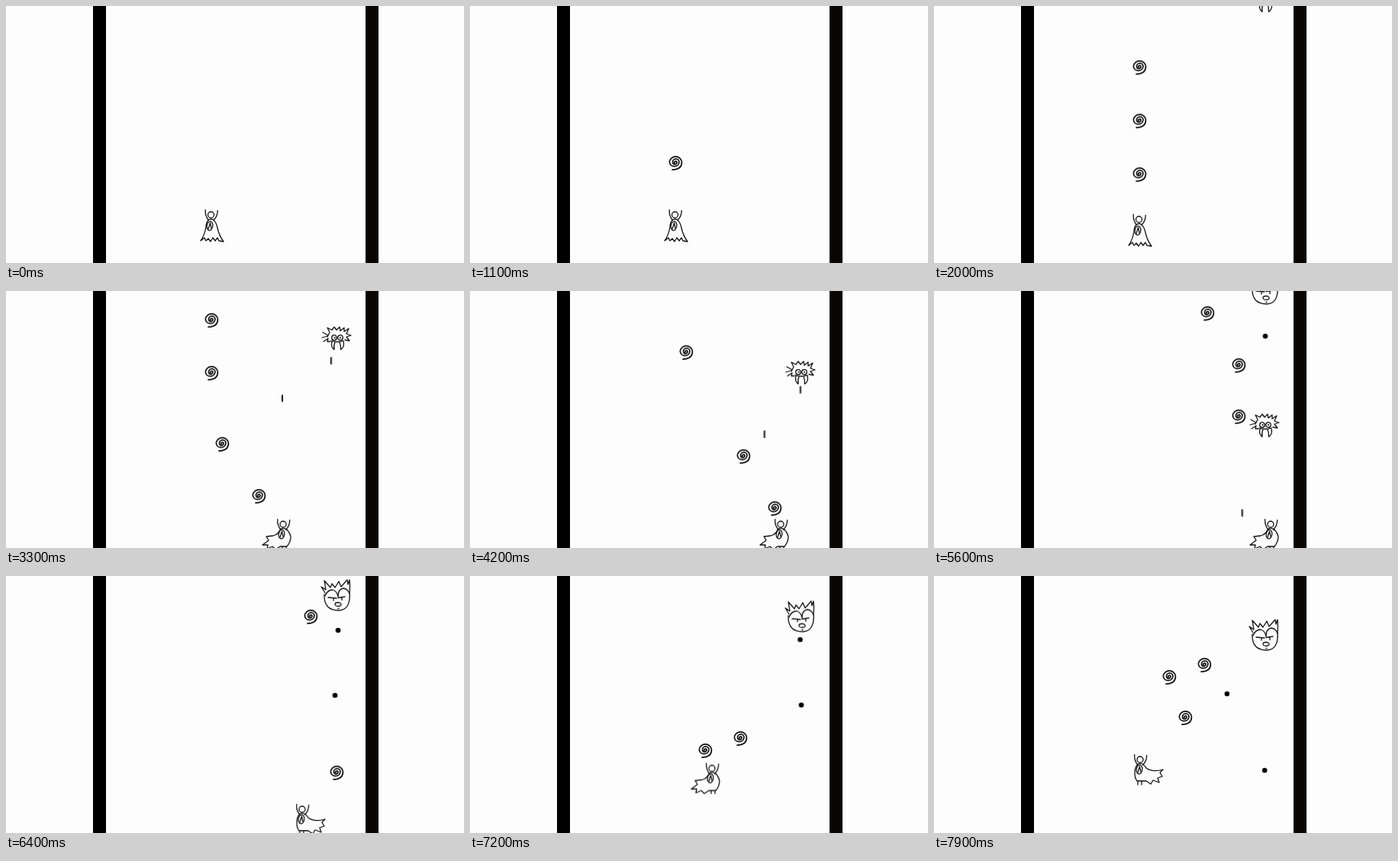
Write an HTML page without scripts that moves like this. It is 600x336 px and loops after 8 s.

```html
<!DOCTYPE html>
<html lang="en">
<head>
<meta charset="utf-8">
<title>Doodle shooter</title>
<style>
html, body { margin: 0; width: 100%; height: 100%; overflow: hidden; background: #fefdfe; }
svg { display: block; width: 600px; height: 336px; }
.ink { fill: none; stroke: #111; stroke-width: 1.3; stroke-linecap: round; stroke-linejoin: round; }

/* spirals share one upward drift; each appears when thrown */
.drift { animation: drift 8s linear infinite; }
.drift use, .shot { visibility: hidden; }
.drift use { animation: var(--life, live) 8s step-end calc(.68s + .5s * var(--n)) infinite; }
.shot { animation: fly 8s linear calc(1s * var(--at)) infinite, var(--life, live) 8s step-end calc(1s * var(--at)) infinite; }
@keyframes drift {
  0% { transform: translateY(0); }
  25% { transform: translateY(-278px); }
  41.25% { transform: translateY(-460px); }
  52.5% { transform: translateY(-580px); }
  70% { transform: translateY(-767px); }
  80% { transform: translateY(-878px); }
  98.75%, 100% { transform: translateY(-1084px); }
}
@keyframes fly {
  0% { transform: translate(0, 0); }
  30%, 100% { transform: translate(var(--dx), var(--dy)); }
}
@keyframes live { 0% { visibility: visible; } 30%, 100% { visibility: hidden; } }
@keyframes mid { 0% { visibility: visible; } 19.4%, 100% { visibility: hidden; } }
@keyframes hit { 0% { visibility: visible; } 6.8%, 100% { visibility: hidden; } }
@keyframes brief { 0% { visibility: visible; } 4.5%, 100% { visibility: hidden; } }

.hero { animation: hero 8s linear infinite; }
@keyframes hero {
  0%, 23% { transform: translate(269px, 266px); }
  25% { transform: translate(269px, 272px); }
  27.5% { transform: translate(269px, 277px); }
  31.9% { transform: translate(269px, 297px); }
  33.5% { transform: translate(283px, 298px); }
  39.75% { transform: translate(331px, 298px); }
  41.25% { transform: translate(355px, 298px); }
  46%, 49% { transform: translate(358px, 298px); }
  52.4%, 62.5% { transform: translate(399px, 298px); }
  64.75% { transform: translate(425px, 298px); }
  66%, 77.25% { transform: translate(433px, 298px); }
  80% { transform: translate(399px, 298px); }
  83.5% { transform: translate(354px, 298px); }
  89.75% { transform: translate(308px, 245px); }
  96% { transform: translate(329px, 232px); }
  98.75%, 100% { transform: translate(281px, 233px); }
}
.idle { animation: idle 8s step-end infinite; }
.right { animation: right 8s step-end infinite; }
.left { animation: left 8s step-end infinite; }
@keyframes idle { 0% { visibility: visible; } 31.9%, 100% { visibility: hidden; } }
@keyframes right {
  0% { visibility: hidden; }
  31.9% { visibility: visible; }
  77.5% { visibility: hidden; }
  90% { visibility: visible; }
  96%, 100% { visibility: hidden; }
}
@keyframes left {
  0% { visibility: hidden; }
  77.5% { visibility: visible; }
  90% { visibility: hidden; }
  96%, 100% { visibility: visible; }
}

.beast { animation: beast 8s linear infinite, slain 8s step-end infinite; }
@keyframes beast {
  0%, 22% { transform: translate(433px, -27px); }
  25% { transform: translate(433px, -7px); }
  41.25% { transform: translate(433px, 62px); }
  52.5% { transform: translate(433px, 107px); }
  70% { transform: translate(433px, 176px); }
  78%, 100% { transform: translate(433px, 207px); }
}
@keyframes slain { 0% { visibility: visible; } 77.6%, 100% { visibility: hidden; } }

.late { animation: late 8s step-end infinite; }
@keyframes late { 0% { opacity: 0; } 50%, 100% { opacity: 1; } }
.face { animation: face 8s linear infinite; }
@keyframes face {
  0%, 60% { transform: translate(434px, -31px); }
  70% { transform: translate(434px, -3px); }
  80% { transform: translate(434px, 25px); }
  98.75%, 100% { transform: translate(434px, 77px); }
}
</style>
</head>
<body>
<svg viewBox="0 0 600 336">
  <defs>
    <path id="s" stroke-width="1.75" d="M-1 1A1.5 1.5 0 0 1 2 0A2.75 2.75 0 0 1 -3.5 0A4.25 4.25 0 0 1 5 0A6.4 6.4 0 0 1 -7.7 0A8.1 8.1 0 0 1 8.4 0M8.4 0Q8.4 10-4 10" />
    <g id="top">
      <path d="M-7.300 .5Q-7.800 9-3 14M8.700 1.500Q8.700 9 3.500 14" />
      <circle cx="0" cy="7" r="4" />
    </g>
    <g id="badge">
      <ellipse rx="3.800" ry="6" transform="rotate(8)" />
      <path d="M-2 4L.5-4L2 3" />
    </g>
  </defs>

  <path d="M114 0H131V336H114Z" />
  <path fill="#080503" d="M471 0H488V336H471Z" />

  <g class="ink">
    <g class="drift">
      <use href="#s" x="269" y="357" style="--n:0" />
      <use href="#s" x="269" y="427" style="--n:1" />
      <use href="#s" x="269" y="497" style="--n:2" />
      <use href="#s" x="269" y="566" style="--n:3" />
      <use href="#s" x="283" y="659" style="--n:4" />
      <use href="#s" x="331" y="727" style="--n:5;--life:hit" />
      <use href="#s" x="358" y="795" style="--n:6" />
      <use href="#s" x="399" y="863" style="--n:7" />
      <use href="#s" x="399" y="930" style="--n:8" />
      <use href="#s" x="425" y="997" style="--n:9;--life:brief" />
      <use href="#s" x="433" y="1065" style="--n:10;--life:hit" />
      <use href="#s" x="433" y="1134" style="--n:11;--life:hit" />
      <use href="#s" x="354" y="1199" style="--n:12" />
      <use href="#s" x="308" y="1215" style="--n:13" />
      <use href="#s" x="329" y="1268" style="--n:14" />
    </g>

    <g stroke-width="2" stroke-linecap="butt">
      <path class="shot" d="M433 19.500v9" style="--at:2.18;--dx:-152px;--dy:249px;--life:mid" />
      <path class="shot" d="M431.300 73.500v9.500" style="--at:3.18;--dx:-107px;--dy:256px" />
      <path class="shot" d="M433.400 122v9.500" style="--at:4.18;--dx:-50px;--dy:276px" />
      <path class="shot" d="M433 171.500v9" style="--at:5.18;--dx:-20px;--dy:276px;--life:brief" />
    </g>

    <g class="beast">
      <path d="M-12-2L-9-8L-12-14L-6-11L-3-15L0-11L4-15L5-10L10-14L10-9L16-13L13-6L19-4L13-2L17 3L11 2M-18-8L-11-4M-19-1L-12-3M-17 4L-11 0L-12 4L-8 4" />
      <circle cx="-3" cy="-1" r="3.300" />
      <circle cx="5" cy="-1" r="3.300" />
      <path stroke-width="2" d="M-2.500-1h.1M5-1h.1" />
      <path d="M-7 3Q1 6 9 3M-6 4Q-8 11-3 14.500Q-4 9-2 5M9 4Q11 11 5.500 14.500Q6 9 4 5" />
    </g>

    <g class="late">
      <g class="face">
        <path d="M-17-1Q-18 20 2 20Q18 19 16-4M-16-3L-21-11L-15-7L-17-19L-9-10L-7-15L-3-10L2-18L5-11L13-20L14-14L16-20Q17-10 16-3" />
        <path d="M-16 1Q-13-7-6-7Q0-5 1 2Q1-8 8-9Q14-8 16-2M-12 3L-1 4M1 3.500L10 2M-5 4v3M6 3v3.500" />
        <ellipse cx="1" cy="12" rx="4" ry="2.500" />
        <path d="M1 17.500h1" />
      </g>
      <g fill="#000" stroke="none">
        <circle class="shot" cx="435.600" cy="8" r="3.300" style="--at:5.18;--dx:-9px;--dy:291px;--life:mid" />
        <circle class="shot" cx="435.300" cy="44" r="3.300" style="--at:6.18;--dx:-3px;--dy:293px" />
        <circle class="shot" cx="434" cy="81" r="3.300" style="--at:7.18;--dx:-167px;--dy:243px" />
      </g>
    </g>

    <g class="hero">
      <g class="idle">
        <use href="#top" x="-.5" />
        <use href="#badge" x="-2" y="21.500" />
        <path d="M-4 14Q-7 17-7 23Q-9 34-14 41L-9 37L-7 41L-4 38L-1 42L2 37L5 41L8 37L10 41L16 42Q10 34 8 24Q6 16 3 14Q0 11-4 14" />
      </g>
      <g class="right">
        <use href="#top" x="8" />
        <use href="#badge" x="6" y="20" />
        <path d="M4 14Q2 20-5 22L-14 23L-11 28L-19 34L-12 34L-13 39L-6 36L-2 40L4 36L13 36Q18 30 18 23Q15 14 11 13Q7 11 4 14M7 36v4M12 36v4" />
      </g>
      <g class="left">
        <use href="#top" x="-11" />
        <use href="#badge" x="-12" y="20" />
        <path d="M-14 13Q-18 17-18 25Q-18 31-15 35L-3 35L3 39L6 34L14 37L12 31L18 29L15 24L19 20Q5 24-3 18Q-8 10-14 13M-14 35v5M-9 35v5" />
      </g>
    </g>
  </g>
</svg>
</body>
</html>
```
